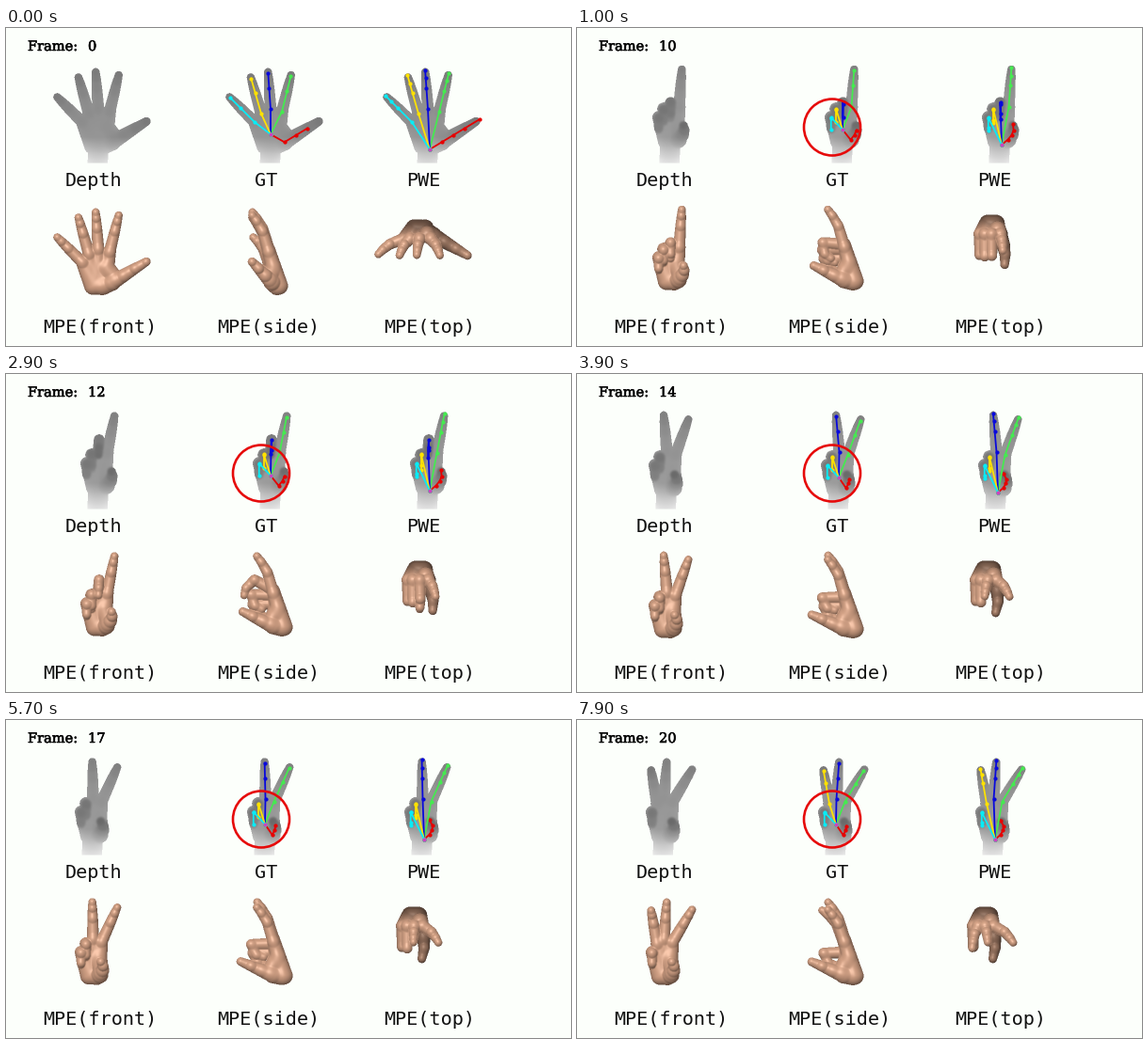
These frames come from a looping animation (600 by 338 pixels, 8 s). A matplotlib script:

```python
import numpy as np
import matplotlib.pyplot as plt
import matplotlib.patheffects as pe
from matplotlib.animation import FuncAnimation

W, H, DPI = 600, 338, 100
PX = 72 / DPI
SS = 2  # supersampling of the shaded hands
BG = np.array([252, 255, 251]) / 255
SKIN = np.array([210, 161, 133]) / 255
COLORS = ["#e60000", "#45ea50", "#0808dc", "#ffe200", "#08ecf6"]

# Bone model; digits run thumb, index, middle, ring, pinky.
KNUCKLES = np.array([(10, -40), (-2, -43), (-12, -38), (-19, -29)])
LENGTHS = (47, 46, 47, 44)
BONES = np.array([0.5, 0.27, 0.23])
OPEN = np.radians([16, 30, 36])
FOLD = np.radians([85, 190, 235])
THUMB_OUT = np.array([53, -32, 31])
THUMB_IN = np.array([12, -22, 47])
THUMB_JOINTS = np.array([0.24, 0.47, 0.7, 1])[:, None]

# counter: wrist x, y, z | curl of five digits | splay of four fingers
POSES = {
    0: [100, 129, -2, 0, 0, 0, 0, 0, 14, -4, -16, -45],
    10: [101, 124, -7, 1, 0, 1, 1.1, 1.1, 4, 0, 0, 0],
    12: [100, 124, -7, 1, 0, 0.65, 1.05, 1.1, 11, 2, 0, 0],
    14: [97, 126, -7, 1.15, 0, 0, 1.1, 1.1, 20, -5, 0, 0],
    18: [93, 127, -7, 1.15, 0, 0, 1.1, 1.1, 26, 0, 0, 0],
    20: [94, 127, -7, 1.15, 0, 0, 0.08, 1.1, 31, 4, -10, 0],
}


def mix(a, b, t):
    return a + (b - a) * t


def joints(n):
    """Wrist and the four 3D joints of each digit."""
    p = np.array([np.interp(n, list(POSES), c) for c in zip(*POSES.values())])
    wrist, curl, splay = p[:3], p[3:8], np.radians(p[8:])
    f = THUMB_JOINTS
    bulge = f * (1 - f) * np.array([20 * curl[0], 0, 0])
    digits = [wrist + f * mix(THUMB_OUT, THUMB_IN, curl[0]) + bulge]
    squeeze = 1 - 0.25 * min(curl[4], 1)
    for (kx, ky), size, c, s in zip(KNUCKLES, LENGTHS, curl[1:], splay):
        a = mix(OPEN, FOLD, c)
        bones = np.array([np.cos(a) * np.sin(s), -np.cos(a) * np.cos(s),
                          np.sin(a)]) * size * BONES
        knuckle = wrist + (kx * squeeze, ky, 11)
        digits.append(np.vstack([knuckle, knuckle + np.cumsum(bones.T, 0)]))
    return wrist, digits


def hand_caps(n, arm=False):
    """Tapered capsules as pairs of (point, radius)."""
    wrist, digits = joints(n)
    thumb, index = digits[:2]
    caps = [((wrist + (2, -4, 2), 10), (thumb[0], 9)),
            ((mix(wrist, index[0], 0.6), 9), (mix(thumb[0], thumb[1], 0.4), 8))]
    for d in digits[1:]:
        heel = wrist + ((d[0][0] - wrist[0]) * 0.4, -4, 0)
        caps.append(((heel, 9.5), (d[0], 6.8)))
    for i, d in enumerate(digits):
        ends = np.vstack([d[:3], mix(d[2], d[3], 0.75)])
        radii = np.linspace(*((8.5, 4.6) if i == 0 else (6.4, 4.2)), 4)
        rows = list(zip(ends, radii))
        caps += zip(rows, rows[1:])
    if arm:
        caps.append(((wrist + (-2, -8, 0), 11), (wrist + (-3, 30, -4), 10.5)))
    return caps


# Each view maps hand space to stage x, stage y and nearness.
VIEWS = {
    "depth": ((44, 36, 116, 110), lambda x, y, z: (x, y, z)),
    "front": ((44, 182, 116, 114), lambda x, y, z: (x, y + 149, z)),
    "side": ((236, 184, 80, 114), lambda x, y, z: (288 - z, y + 149, x - 100)),
    "top": ((386, 192, 120, 76), lambda x, y, z: (x + 341, 215 + z, 129 - y)),
}


def blur(a, times):
    for _ in range(times):
        for axis in (0, 1):
            a = (np.roll(a, 1, axis) + 2 * a + np.roll(a, -1, axis)) / 4
    return a


def relief(caps, view):
    """Soft union of capsules: stage y, height, normals and mask."""
    (x0, y0, w, h), project = VIEWS[view]
    X, Y = np.meshgrid(x0 + (np.arange(w * SS) + 0.5) / SS,
                       y0 + (np.arange(h * SS) + 0.5) / SS)
    k = 2.0
    acc = np.zeros_like(X)
    nrm = np.zeros(X.shape + (3,))
    for (a, ra), (b, rb) in caps:
        ax_, ay, az = project(*a)
        bx, by, bz = project(*b)
        dx, dy = bx - ax_, by - ay
        t = ((X - ax_) * dx + (Y - ay) * dy) / (dx * dx + dy * dy + 1e-6)
        # overlapping ends seen head-on need the nearer one
        t = np.clip(t, 0, 1)
        for s in (t, np.full_like(t, float(bz > az))):
            r = mix(ra, rb, s)
            ox, oy = X - ax_ - s * dx, Y - ay - s * dy
            m = ox * ox + oy * oy < r * r
            ox, oy, r = ox[m], oy[m], r[m]
            oz = np.sqrt(r * r - ox * ox - oy * oy)
            weight = np.exp((mix(az, bz, s[m]) + oz) / k)
            acc[m] += weight
            nrm[m] += np.stack([ox, oy, oz], 1) * (weight / r)[:, None]
    mask = acc > 0
    height = np.where(mask, k * np.log(np.where(mask, acc, 1)), 0)
    return Y, height, nrm / np.where(mask, acc, 1)[..., None], mask


def finish(rgb, mask):
    img = np.where(mask[..., None], np.clip(rgb, 0, 1), BG)
    h, w = mask.shape
    return img.reshape(h // SS, SS, w // SS, SS, 3).mean((1, 3))


def depth_hand(n):
    Y, z, _, mask = relief(hand_caps(n, arm=True), "depth")
    z = blur(z, 8) / np.maximum(blur(mask * 1.0, 8), 0.05)
    gray = 164 - 1.3 * z + 60 * np.clip((Y - 116) / 26, 0, 1)
    return finish(np.repeat(gray[..., None] / 255, 3, 2), mask & (Y < 143.5))


def skin_hand(n, view):
    _, z, nrm, mask = relief(hand_caps(n), view)
    nrm = blur(nrm, 2)
    nrm /= np.linalg.norm(nrm, axis=2, keepdims=True) + 1e-9
    light = np.array([-0.2, -0.38, 0.9])
    half = light + (0, 0, 1)
    half /= np.linalg.norm(half)
    diff = np.clip(nrm @ light, 0, 1)
    spec = np.clip(nrm @ half, 0, 1) ** 40
    rgb = SKIN * (0.5 + 0.52 * diff)[..., None] + 0.16 * spec[..., None]
    if view == "top":  # the wrist opening lies in shadow
        rgb *= (0.5 + 0.5 * np.clip((z - 12) / 28, 0, 1))[..., None]
    return finish(rgb, mask)


cache = {}


def hands(n):
    if n not in cache:
        cache[n] = [depth_hand(n)] + [skin_hand(n, v)
                                      for v in ("front", "side", "top")]
    return cache[n]


fig = plt.figure(figsize=(W / DPI, H / DPI), dpi=DPI, facecolor=BG)
ax = fig.add_axes([0, 0, 1, 1])
ax.axis("off")


def panel(view, dx=0):
    x, y, w, h = VIEWS[view][0]
    return ax.imshow(np.ones((h, w, 3)) * BG, aspect="auto",
                     extent=(x + dx, x + dx + w, y + h, y),
                     interpolation="nearest")


def skeleton():
    lines = [ax.plot([], [], "-o", color=c, lw=1.8 * PX, ms=4.2 * PX,
                     mew=0, zorder=3)[0] for c in COLORS]
    return lines + ax.plot([], [], "o", color="#d040c0", ms=4 * PX, mew=0,
                           zorder=4)


def trace(lines, root, digits, dx):
    root = root[:2] + (dx, 0)
    for line, d in zip(lines, digits):
        line.set_data(*np.vstack([root, d[:, :2] + (dx, 0)]).T)
    lines[-1].set_data(root[:1], root[1:])


def annotated(digits):
    """Three joints per digit, ending short of the fingertip."""
    return [np.vstack([d[:2], mix(d[2], d[3], 0.6 if i else 0)])
            for i, d in enumerate(digits)]


depths = [panel("depth", dx) for dx in (0, 183, 350)]
models = [panel(v) for v in ("front", "side", "top")]
gt, pwe = skeleton(), skeleton()
ring = plt.Circle((271, 105.5), 30, fill=False, ec="#e60a0a",
                  lw=2.6 * PX, zorder=5)
ax.add_patch(ring)

for x, y, s in [(63, 168.5, "Depth"), (264, 168.5, "GT"), (425, 168.5, "PWE"),
                (39, 323.5, "MPE(front)"), (224, 323.5, "MPE(side)"),
                (401, 323.5, "MPE(top)")]:
    ax.text(x, y, s, family="DejaVu Sans Mono", size=20.2 * PX,
            color="#111111")

heavy = dict(family="DejaVu Serif", size=14.6 * PX, color="black",
             path_effects=[pe.withStroke(linewidth=0.4, foreground="black")])
ax.text(23, 24, "Frame:", **heavy)
count = ax.text(87, 24, "0", **heavy)
ax.set_xlim(0, W)
ax.set_ylim(H, 0)


def counter(i):
    """Full speed up to ten, then slow motion."""
    return i if i <= 10 else 10 + (i - 10) * 3 // 20


def draw(i):
    n = counter(i)
    depth, *skins = hands(n)
    for im in depths:
        im.set_data(depth)
    for im, img in zip(models, skins):
        im.set_data(img)
    wrist, digits = joints(n)
    trace(gt, wrist + (-2, -16, 0), annotated(digits), 183)
    trace(pwe, wrist, digits, 350)
    ring.set_visible(n >= 10)
    count.set_text(str(n))
    return []


anim = FuncAnimation(fig, draw, frames=80, interval=100, repeat=True)
plt.show()
```
